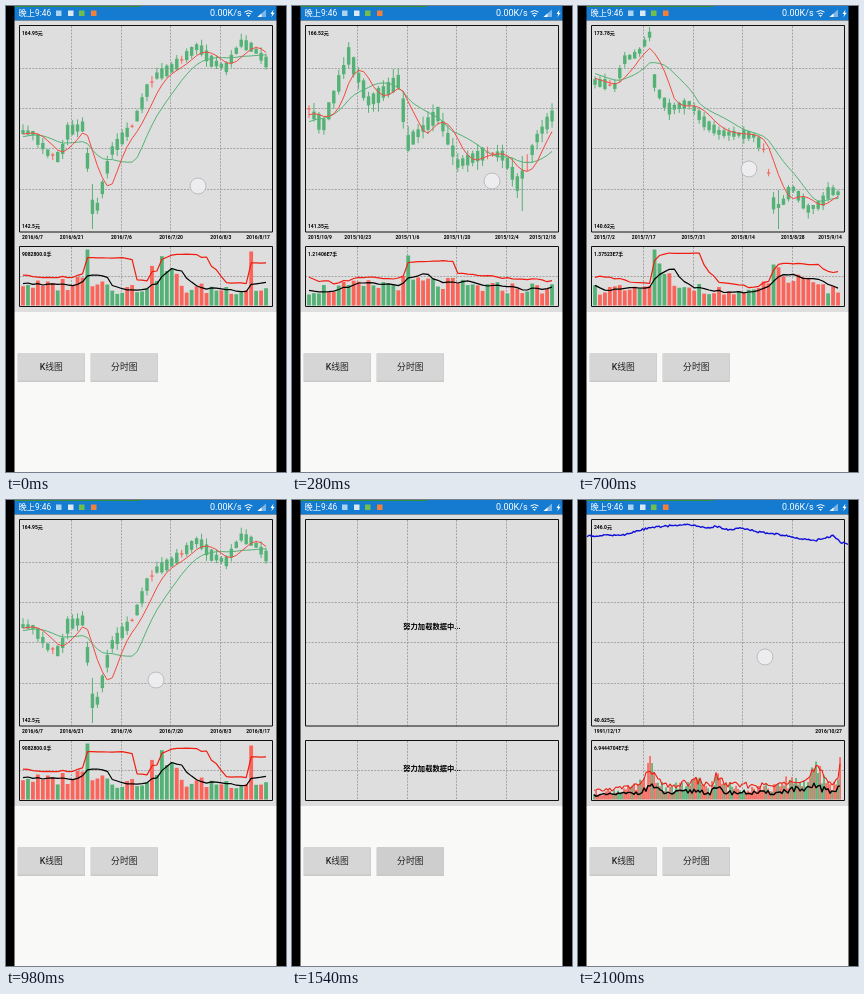
An HTML page that plays this animation: 280 px wide and 466 px high, repeating every 2.24 s.

```html
<!DOCTYPE html>
<html lang="zh">
<head>
<meta charset="utf-8">
<style>
html, body { margin: 0; width: 100%; height: 100%; overflow: hidden; background: #000; }
svg { display: block; width: 100vw; height: 100vh; }
text { font-family: Roboto, "Noto Sans CJK SC", "Noto Sans CJK", sans-serif; }
.tag { font-size: 5px; font-weight: 700; }
.wait { font-size: 7.3px; font-weight: 700; }
.btn { font-size: 8.8px; font-weight: 500; fill: #222; }
.bar { font-size: 8.3px; fill: #fff; }
#rate { font-size: 9px; }
</style>
</head>
<body>
<svg viewBox="0 0 280 466" preserveAspectRatio="none">
  <rect width="280" height="466"/>
  <rect x="8.5" width="262" height="14.5" fill="#147bd1"/>
  <rect x="8.5" width="126.5" height="1" fill="#2f8f3a"/>
  <rect x="8.5" y="14.5" width="262" height="291.5" fill="#dedede"/>
  <rect x="8.5" y="306" width="262" height="160" fill="#f9f9f8"/>
  <text class="bar" x="12.5" y="10.4">晚上9:46</text>
  <rect x="50" y="4.5" width="5.5" height="5.5" fill="#a8d4f2"/>
  <rect x="62" y="4.5" width="5.5" height="5.5" fill="#d8e8f4"/>
  <rect x="73" y="4.5" width="5.5" height="5.5" fill="#6fbf4a"/>
  <rect x="85" y="4.5" width="5.5" height="5.5" fill="#f0803c"/>
  <text class="bar" id="rate" x="204" y="10.4"></text>
  <path d="M238.500 6Q242.500 3 246.500 6M240 8Q242.500 6 245 8" fill="none" stroke="#fff"/>
  <path d="M241 9H244L242.500 11ZM267.500 3.500L264.500 8H266.300L265.300 11.300L268.700 6.800H266.800Z" fill="#fff"/>
  <path d="M251.500 11H260V3.500Z" fill="#7db6e6"/><path d="M251.500 11H255.500V7.500Z" fill="#fff"/>
  <g id="grid"></g>
  <g id="plot"></g>
  <g id="keys"></g>
  <g id="over"></g>
</svg>
<script>
const $ = id => document.getElementById(id);
const RED = '#f9655a', GREEN = '#55b276';
const STEP = 140, COUNT = 16;
const BARS = 50, LEAD = 10, PITCH = 4.96, LEFT = 17, BASE = 299.5;

const rnd = (i, k) => { const v = Math.sin(i * 12.9898 + k * 78.233) * 43758.5453; return v - Math.floor(v); };
const clamp = (v, a, b) => Math.max(a, Math.min(b, v));
const barX = i => LEFT + i * PITCH;
const pairs = s => s.split(', ').map(p => p.split(' ').map(Number));

// Height of a polyline at x
function at(pts, x) {
  let i = 1;
  while (i < pts.length - 1 && pts[i][0] < x) i++;
  const [a, b] = [pts[i - 1], pts[i]];
  return a[1] + (b[1] - a[1]) * clamp((x - a[0]) / (b[0] - a[0]), 0, 1);
}

const rect = (x, y, w, h, c) => `<rect x="${x.toFixed(2)}" y="${y.toFixed(2)}" width="${w}" height="${h.toFixed(2)}" fill="${c}"/>`;
const line = (x1, y1, x2, y2, c, w = 1, extra = '') => `<path d="M${x1} ${y1}L${x2} ${y2}" stroke="${c}" stroke-width="${w}" ${extra}/>`;
const poly = (pts, c, w) => `<polyline points="${pts.map(p => p[0].toFixed(1) + ',' + p[1].toFixed(1)).join(' ')}" fill="none" stroke="${c}" stroke-width="${w}" stroke-linejoin="round"/>`;
const text = (x, y, s, cls = 'tag', anchor = 'start') => `<text class="${cls}" x="${x}" y="${y}" text-anchor="${anchor}">${s}</text>`;
const labels = (top, low, most) => text(16, 28.5, top) + text(16, 221.5, low) + text(16, 249.5, most);

// price and vol are key points; spikes are [bar, height, colour]; wick is [bar, top, bottom]
const summer = {
  seed: 3, size: 1, year: 2016, days: '6/7 6/21 7/6 7/20 8/3 8/17',
  top: '164.95元', low: '142.5元', most: '9082800.0手',
  price: pairs('-30 136, 17 126, 27 127, 42 147, 54 152, 62 125, 78 120, 82 160, 87 206, 92 200, 105 146, 128 118, 142 82, 150 70, 165 63, 192 40, 205 55, 220 62, 235 37, 247 42, 260 56'),
  vol: pairs('-30 22, 17 23, 38 18, 60 22, 88 28, 112 17, 135 17, 157 42, 178 17, 262 16'),
  spikes: [[13, 56, GREEN], [46, 54, RED]], wick: [14, 178, 223]
};
const spring = {
  seed: 8, size: 2, year: 2016, days: '3/21 4/5 4/19 5/3 5/17 6/1',
  top: '158.81元', low: '142.61元', most: '1.31902E7手',
  price: pairs('-30 230, 17 130, 25 105, 31 158, 40 105, 57 47, 67 72, 77 112, 92 92, 111 52, 116 168, 122 163, 130 98, 146 88, 156 140, 166 186, 180 158, 196 88, 212 116, 226 155, 238 138, 246 68, 260 34'),
  vol: pairs('-30 30, 17 15, 40 21, 85 16, 112 24, 125 30, 140 18, 200 16, 240 12, 262 16'),
  spikes: [[20, 57, GREEN], [32, 28, RED], [49, 25, RED]], wick: [20, 145, 223]
};
const winter = {
  seed: 5, size: 1.5, year: 2015, days: '10/9 10/23 11/6 11/20 12/4 12/18',
  top: '166.52元', low: '141.35元', most: '1.21406E7手',
  price: pairs('-30 130, 17 103, 31 121, 57 49, 77 96, 107 75, 116 137, 146 108, 166 158, 196 146, 212 150, 226 179, 246 130, 260 110'),
  vol: pairs('-30 20, 17 16, 85 20, 120 24, 190 18, 262 17'),
  spikes: [[20, 50, GREEN]], wick: [43, 150, 205]
};
const crash = {
  seed: 11, size: 1, year: 2015, days: '7/2 7/17 7/31 8/14 8/28 9/14',
  top: '173.78元', low: '140.62元', most: '1.37523E7手',
  price: pairs('-30 58, 17 76, 37 80, 47 53, 60 48, 72 28, 77 80, 90 103, 112 97, 127 117, 142 127, 175 129, 187 145, 196 200, 203 200, 214 181, 230 203, 243 198, 252 184, 262 188'),
  vol: pairs('-30 20, 17 17, 57 14, 72 22, 90 27, 102 14, 120 20, 140 14, 178 12, 195 32, 215 25, 250 15, 262 18'),
  spikes: [[12, 56, GREEN], [13, 42, GREEN], [36, 41, GREEN]], wick: [37, 184, 223]
};
const autumn = {
  seed: 17, size: 1.3, year: 2016, days: '8/18 9/1 9/16 9/30 10/14 10/27',
  top: '166.0元', low: '147.79元', most: '1.27706E7手',
  price: pairs('-30 42, 17 66, 42 86, 60 92, 82 70, 88 85, 94 116, 103 110, 112 138, 125 126, 147 147, 157 107, 162 92, 173 110, 180 100, 200 132, 214 155, 222 142, 226 200, 245 192, 252 188, 262 158'),
  vol: pairs('-30 18, 17 14, 50 13, 90 19, 115 19, 130 13, 175 12, 215 15, 228 26, 240 22, 252 13, 262 18'),
  spikes: [[20, 30, GREEN], [42, 56, RED], [43, 34, GREEN]], wick: [29, 22, 110]
};

function stats(list, i, n) {
  const part = list.slice(i + LEAD - n + 1, i + LEAD + 1);
  const mean = part.reduce((a, b) => a + b) / part.length;
  return { mean, dev: Math.sqrt(part.reduce((a, b) => a + (b - mean) ** 2, 0) / part.length) };
}

function candles(d) {
  const mid = [], vol = [], fast = [], slow = [], upper = [], mean = [];
  for (let i = -LEAD; i < BARS; i++) {
    const spike = d.spikes.find(p => p[0] === i);
    mid.push(at(d.price, barX(i)));
    vol.push(spike ? spike[1] : at(d.vol, barX(i)) * (.65 + rnd(i, d.seed) * .7));
  }
  let s = '';
  for (let i = 0; i < BARS; i++) {
    const x = barX(i), m = mid[i + LEAD], h = vol[i + LEAD];
    const jump = Math.min(Math.abs(m - mid[i + LEAD - 1]), 30);
    const doji = rnd(i, d.seed + 1) > .95;
    const half = doji ? .6 : (1.5 + rnd(i, d.seed + 2) * 3.5) * d.size + jump * .15;
    const wick = d.wick[0] === i ? d.wick.slice(1)
      : [m - half - rnd(i, d.seed + 3) * 6 * d.size, m + half + rnd(i, d.seed + 4) * 6 * d.size];
    const [y1, y2] = [m - half, m + half].map(y => clamp(y, 22, 223));
    const c = doji ? RED : GREEN;
    s += line(x, clamp(wick[0], 21, 224), x, clamp(wick[1], 21, 224), c) + rect(x - 1.7, y1, 3.4, y2 - y1, c);

    const spike = d.spikes.find(p => p[0] === i);
    s += rect(x - 1.9, BASE - h, 3.8, h, spike ? spike[2] : rnd(i, d.seed + 5) > .66 ? GREEN : RED);

    const band = stats(vol, i, 10);
    fast.push([x, stats(mid, i, 5).mean]);
    slow.push([x, stats(mid, i, 10).mean]);
    mean.push([x, BASE - stats(vol, i, 5).mean]);
    upper.push([x, BASE - Math.min(band.mean + 2 * band.dev, 56)]);
  }
  s += poly(slow, GREEN, 1) + poly(fast, '#f4493f', 1) + poly(upper, '#f01d10', 1.2) + poly(mean, '#000', 1.2);
  d.days.split(' ').forEach((day, i) => {
    const x = i === 0 ? 16 : i === 5 ? 264 : 16 + i * 49.7;
    s += text(x, 232.8, d.year + '/' + day, 'tag', i === 0 ? 'start' : i === 5 ? 'end' : 'middle');
  });
  return s + labels(d.top, d.low, d.most);
}

const close = pairs('9 36, 45 35, 70 28, 110 24, 130 28, 138 26, 150 30, 165 28, 180 32, 205 35, 235 41, 255 36, 262 42, 271 44');
const turnover = pairs('17 8, 55 14, 67 22, 72 43, 78 24, 90 13, 120 22, 132 14, 138 27, 150 16, 200 15, 215 27, 227 20, 239 38, 248 21, 256 18, 262 42');

function history() {
  let s = '';
  const blue = [], hi = [], lo = [];
  for (let x = 9; x <= 271; x += 1.5) blue.push([x, at(close, x) + (rnd(x, 7) - .5) * 1.8]);
  for (let i = 0; i < 124; i++) {
    const x = 16 + i * 2, base = at(turnover, x), h = base * (.45 + rnd(i, 8) * .65);
    s += rect(x - .8, BASE - h, 1.7, h, rnd(i, 9) > .68 ? GREEN : RED);
    hi.push([x, 297 - base * (.55 + rnd(i, 10) * .4)]);
    lo.push([x, 298 - base * (.2 + rnd(i, 11) * .28)]);
  }
  return s + poly(hi, '#f01d10', 1.1) + poly(lo, '#000', 1.4) + poly(blue, '#1010d8', 1.4)
    + labels('246.0元', '40.625元', '6.9444704E7手')
    + text(16, 232.8, '1991/12/17') + text(264, 232.8, '2016/10/27', 'tag', 'end');
}

const loading = () => [128.7, 270.7].map(y => text(140, y, '努力加载数据中...', 'wait', 'middle')).join('');

function grid() {
  const dash = (...p) => line(...p, '#969696', .8, 'stroke-dasharray="2 1.3"');
  let s = '';
  for (const x of [65.5, 115.5, 164.5, 214.5]) s += dash(x, 20, x, 226) + dash(x, 241, x, 301);
  for (const y of [62.5, 102.5, 142.5, 183.5, 270.5]) s += dash(13, y, 267, y);
  return s + '<path d="M13.500 19.500H266.500V226H13.500ZM13.500 240.500H266.500V300.500H13.500Z" fill="none" stroke="#111"/>';
}

function button(x, label, pressed) {
  return rect(x - .5, 347.5, 67.5, 28.5, '#c9c9c9') + rect(x, 347, 66.5, 27.5, pressed ? '#cecece' : '#d6d6d6')
    + text(x + 33.3, 364.3, label, 'btn', 'middle');
}

const crosshair = (x, y) => line(x, 21, x, 224, '#000', 1.3) + line(x, 242, x, 300, '#000', 1.3) + line(14, y, 267, y, '#000', 1.3);
const touch = (x, y, alpha = .85) => `<circle cx="${x}" cy="${y}" r="8" fill="#f0f0f2" stroke="#b4b4bc" opacity="${alpha}"/>`;

const views = [summer, spring, winter, crash, crash, crash, spring, summer, autumn, autumn, autumn];
const finger = [[192, 180], [230, 177, .4], [200, 175], [147, 172], [160, 168], [171, 163], [100, 170], [150, 180],
  [98, 193], [115, 285], [131, 380], null, [150, 150], [160, 155], [175, 157], [187, 157]];
const cross = { 3: [188.5, 168.5], 4: [203, 165] };
const LOADING = 11;

function draw(n) {
  $('plot').innerHTML = n < LOADING ? candles(views[n]) : n === LOADING ? loading() : history();
  $('keys').innerHTML = button(12, 'K线图') + button(85, '分时图', n === LOADING - 1 || n === LOADING);
  $('over').innerHTML = (cross[n] ? crosshair(...cross[n]) : '') + (finger[n] ? touch(...finger[n]) : '');
  $('rate').textContent = n > LOADING ? '0.06K/s' : '0.00K/s';
}

$('grid').innerHTML = grid();
let shown = -1;
const start = performance.now();
function tick() {
  const n = Math.floor((performance.now() - start) / STEP) % COUNT;
  if (n !== shown) draw(shown = n);
  requestAnimationFrame(tick);
}
tick();
</script>
</body>
</html>
```
